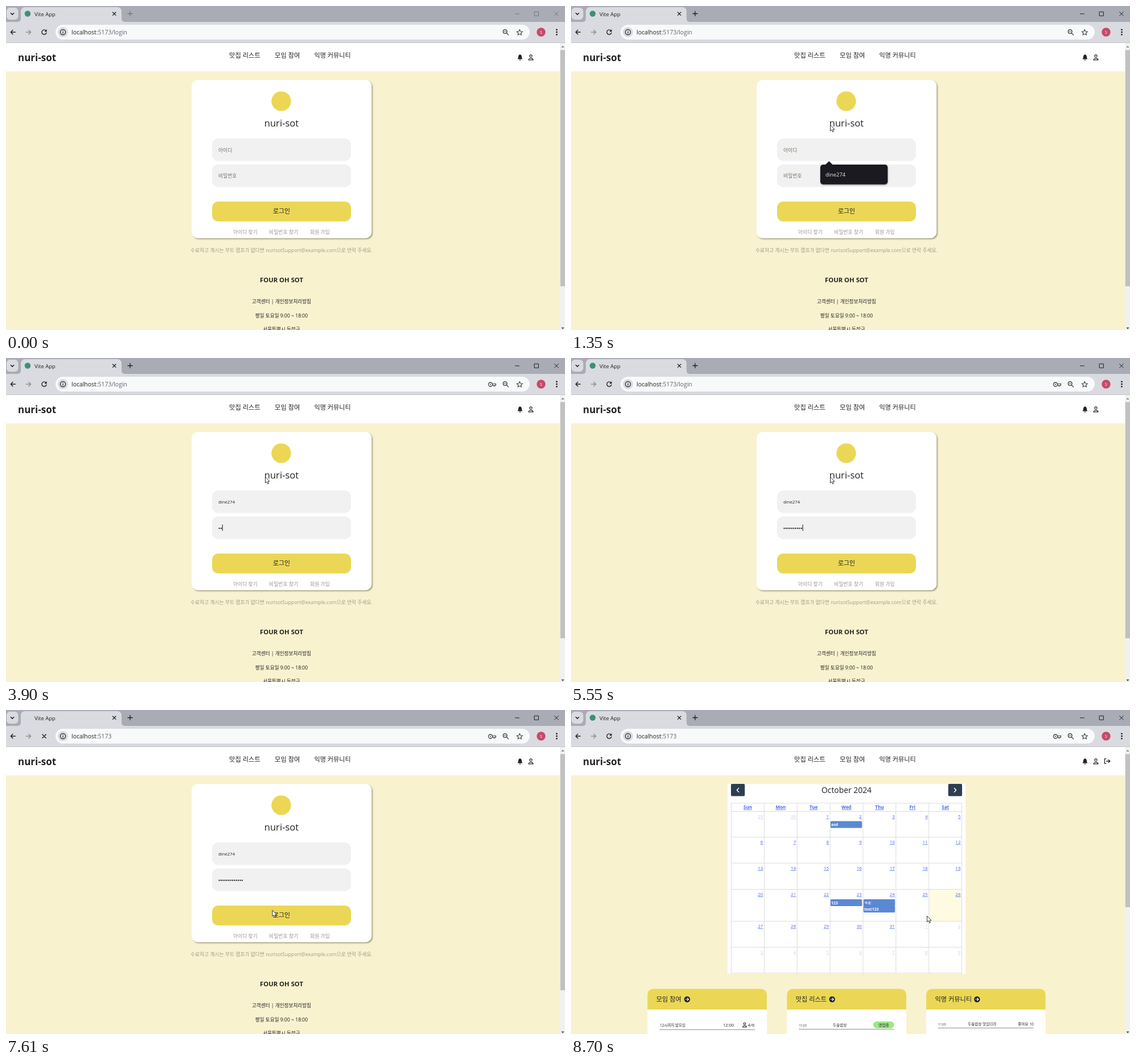
An HTML page that plays this animation: 982x570 px, repeating every 8.77 s.

```html
<!DOCTYPE html>
<html lang="ko">
<head>
<meta charset="utf-8">
<title>Login</title>
<style>
html, body { margin: 0; width: 100%; height: 100%; overflow: hidden; background: #f9f2cf; }
svg { display: block; width: 100%; height: 100%; }
text { font-family: "Open Sans", "Noto Sans CJK KR", "Noto Sans CJK", sans-serif; fill: #222; white-space: pre; }
.line { fill: none; stroke-linecap: round; stroke-linejoin: round; }
</style>
</head>
<body>
<svg id="stage" viewBox="0 0 982 570"></svg>
<script>
const LOOP = 8770;
const USER = 'dine274';
const BRAND = 'nuri-sot';
const PLACE = '두솔밥상';
const YELLOW = '#ebd755';
const DARK = '#202124';

const rect = (x, y, w, h, fill, r = 0, extra = '') =>
  `<rect x="${x}" y="${y}" width="${w}" height="${h}" rx="${r}" fill="${fill}" ${extra}/>`;
const circle = (x, y, r, fill, extra = '') =>
  `<circle cx="${x}" cy="${y}" r="${r}" fill="${fill}" ${extra}/>`;
const line = (d, color = DARK, w = 1.3, extra = '') =>
  `<path class="line" d="${d}" stroke="${color}" stroke-width="${w}" ${extra}/>`;
const shape = (d, fill, extra = '') => `<path d="${d}" fill="${fill}" ${extra}/>`;
const text = (x, y, s, size, { fill = '#222', weight = 400, anchor = 'start', extra = '' } = {}) =>
  `<text x="${x}" y="${y}" font-size="${size}" font-weight="${weight}" text-anchor="${anchor}" style="fill:${fill}" ${extra}>${s}</text>`;
const group = (id, body) => `<g id="${id}">${body}</g>`;

const person = (x, y, s = 1) => `<g transform="translate(${x} ${y}) scale(${s})">` +
  `<circle cy="-2.4" r="2.1" fill="none" stroke="${DARK}" stroke-width="1.2"/>` +
  line('M-4 4.6C-4 0.6 4 0.6 4 4.6Z', DARK, 1.2) + '</g>';
const arrowBadge = (x, y) => circle(x, y, 5.2, DARK) +
  line(`M${x - 2.6} ${y}h5M${x + 0.3} ${y - 2.3}l2.3 2.3l-2.3 2.3`, '#fff', 1.2);

function browser() {
  return rect(0, 0, 982, 40, '#a9acb5') +
    rect(0, 28, 982, 37, '#d9dbe0') +
    rect(0, 64, 982, 1, '#bfc1c6') +
    rect(1, 3, 20.5, 21, '#d9dbe0', 6) +
    line('M8.5 12.5l2.6 2.6l2.6 -2.6', DARK, 1.5) +
    shape('M20 28Q26 28 26 22V10Q26 2 34 2H195Q203 2 203 10V22Q203 28 209 28Z', '#d9dbe0') +
    group('favicon', circle(38, 13.5, 5.2, '#3f8f78')) +
    text(50, 18.3, 'Vite App', 9.5) +
    line('M187.5 11l5.4 5.4m0 -5.4l-5.4 5.4', DARK, 1.3) +
    `<g id="controls">` +
    '<path class="line" d="M214 13.5h8M218 9.5v8" stroke-width="1.3"/>' +
    '<path class="line" d="M894.5 13.8h7M928.5 10.3h7v7h-7zM963.5 10.3l7 7m0 -7l-7 7" stroke-width="1"/></g>' +
    line('M16.3 46H8.5M12 42.3L8.3 46l3.7 3.7', DARK, 1.4) +
    line('M35.7 46h7.8M40 42.3l3.7 3.7l-3.7 3.7', '#8b8d92', 1.3) +
    group('reload', line('M70.2 43.3A4.1 4.1 0 1 0 71 47.2', DARK, 1.4) + shape('M71.6 41v4.3h-4.3z', DARK)) +
    group('stop', line('M64 43l6.2 6.2m0 -6.2l-6.2 6.2', DARK, 1.4)) +
    rect(87, 33, 833, 26, '#f8f9fb', 13) +
    circle(100, 46, 9, '#d9dbe0') +
    circle(100, 46, 4.6, 'none', `stroke="${DARK}" stroke-width="1.2"`) +
    line('M100 45.8v2.3M100 43.7v0.1', DARK, 1.2) +
    '<text x="115" y="50.2" font-size="10.45">localhost<tspan id="path" style="fill:#5f6368"></tspan></text>' +
    group('key', circle(851, 46.5, 3.5, 'none', 'stroke="#3c4043" stroke-width="1.3"') +
      circle(851, 46.5, 1.1, '#3c4043') +
      line('M854.5 45.3h6v2.6h-1.7v1.6h-2v-1.6h-2.2', '#3c4043', 1.1)) +
    circle(876.7, 45, 3.4, 'none', 'stroke="#3c4043" stroke-width="1.3"') +
    line('M879.3 47.6l3.4 3.4M875.2 45h3', '#3c4043', 1.2) +
    line('M902.3 41.3l1.5 3.4l3.6 .3l-2.8 2.4l.9 3.6l-3.2 -1.9l-3.2 1.9l.9 -3.6l-2.8 -2.4l3.6 -.3z', '#3c4043', 1.1) +
    circle(940, 46, 7.7, '#c6496a') +
    text(940, 48.5, 'S', 7, { fill: '#fff', anchor: 'middle' }) +
    [41.7, 46, 50.3].map(y => circle(967.5, y, 1.4, DARK)).join('');
}

function header() {
  return rect(0, 65, 973, 50, '#fff') +
    text(21, 97, BRAND, 17, { weight: 700 }) +
    text(392, 90.5, '맛집 리스트', 11.3) +
    text(472, 90.5, '모임 참여', 11.3) +
    text(541.5, 90.5, '익명 커뮤니티', 11.1) +
    shape('M898.5 93.6Q900 92 900 89.5Q900 86 903 85.2Q906 86 906 89.5Q906 92 907.5 93.6ZM901.4 94.4h3.2a1.6 1.3 0 0 1 -3.2 0Z', DARK) +
    person(922, 90.3) +
    group('logout', line('M940 85.8h-2.6v8.4h2.6M940.6 90h6M944.2 87.4l2.6 2.6l-2.6 2.6', DARK, 1.3));
}

function login() {
  const links = '#99978a';
  const field = y => rect(362, y, 244, 39.7, '#f1f1f1', 11);
  const center = { anchor: 'middle' };
  return rect(327.7, 131.7, 316.3, 278.5, '#8d8a76', 11, 'opacity=".8" filter="url(#soft)"') +
    rect(326, 130, 316.3, 278.5, '#fff', 11) +
    circle(483.5, 167.5, 17.2, YELLOW) +
    text(484, 212, BRAND, 16.6, center) +
    field(233) + field(278.7) +
    rect(362, 344, 244, 35, YELLOW, 11) +
    text(484, 365.4, '로그인', 10.9, { weight: 500, anchor: 'middle' }) +
    text(399, 401.4, '아이디 찾기', 8.8, { fill: links }) +
    text(462, 401.4, '비밀번호 찾기', 8.9, { fill: links }) +
    text(534, 401.4, '회원 가입', 8.8, { fill: links }) +
    text(484, 433.3, '수료하고 계시는 부트 캠프가 없다면 nurisotSupport@example.com으로 연락 주세요.', 8.75, { fill: '#a19d88', anchor: 'middle' }) +
    text(484, 485.5, 'FOUR OH SOT', 11.3, { weight: 700, anchor: 'middle' }) +
    text(484, 523.4, '고객센터 | 개인정보처리방침', 8.6, center) +
    text(484, 547.8, '평일 토요일 9:00 ~ 18:00', 8.6, center) +
    text(484, 572.2, '서울특별시 동작구', 8.6, center) +
    group('idHint', text(373, 256.6, '아이디', 8.8, { fill: '#757566' })) +
    group('pwHint', text(373, 302.2, '비밀번호', 8.8, { fill: '#757566' })) +
    text(373, 256.4, '', 7.75, { extra: 'id="idText"' }) +
    '<g id="dots"></g>' +
    rect(0, 0, 1, 11, '#111', 0, 'id="caret"') +
    group('popup', rect(438, 280, 118.5, 35, '#000', 5, 'opacity=".4" filter="url(#soft)"') +
      shape('M446.5 279.5L453.3 273L460 279.5Z', '#1a1a20') +
      rect(438, 279, 118.3, 34.7, '#1a1a20', 5, 'id="popupBox"') +
      text(447, 299.7, USER, 9.35, { fill: '#e6e6e8' }));
}

function month(bounds, events) {
  const X = 281.5, COL = 57.86, BLUE = '#4a69e8';
  let s = rect(628.5, bounds[3], COL, bounds[4] - bounds[3], '#fffbe2');
  ['Sun', 'Mon', 'Tue', 'Wed', 'Thu', 'Fri', 'Sat'].forEach((d, i) => {
    s += text(X + COL * (i + .5), 174, d, 8, { fill: BLUE, weight: 700, anchor: 'middle', extra: 'text-decoration="underline"' });
  });
  for (let i = 0; i < 42; i++) {
    const n = i - 1, out = n < 1 || n > 31;
    const label = n < 1 ? n + 30 : n > 31 ? n - 31 : n;
    s += text(X + COL * (i % 7 + 1) - 2, bounds[i / 7 | 0] + 11.6, label, 8,
      { fill: BLUE, anchor: 'end', extra: `text-decoration="underline" opacity="${out ? .3 : 1}"` });
  }
  let grid = bounds.map(y => `M281 ${y}H687`).join('') + 'M281 164H687';
  for (let i = 0; i < 8; i++) grid += `M${X + COL * i} 164V463`;
  s += line(grid, '#dcdcdc', 1);
  return s + events.map(([col, y, label]) =>
    rect(X + COL * col + .8, y, 55.4, 11.9, '#5b88d3', 1.5) +
    text(X + COL * col + 2, y + 8.6, label, 7, { fill: '#fff', weight: 700 })).join('');
}

function panel(x, title, iconX, body) {
  return rect(x, 490.5, 209.7, 100, '#fff', 12) +
    shape(`M${x} 527V502.5q0 -12 12 -12h185.7q12 0 12 12V527Z`, YELLOW) +
    text(x + 15.5, 512.5, title, 11.2, { weight: 500 }) + arrowBadge(iconX, 509) + body;
}

function home() {
  const before = [0, 1, 2, 3, 4, 5, 6].map(i => 178.5 + i * 47.42);
  const after = [178.5, 223.7, 269.3, 315.5, 371.7, 417.3, 463];
  const rule = (x, y) => line(`M${x} ${y}h167`, '#8a8a8a', 1);
  return rect(275, 130, 418, 334, '#fff') +
    rect(281, 130, 24.3, 21.6, '#2c3e50', 2) + rect(662.7, 130, 24.3, 21.6, '#2c3e50', 2) +
    group('chevrons', line('M294.6 137.6l-3.2 3.3l3.2 3.3M673.4 137.6l3.2 3.3l-3.2 3.3', '#fff', 1.5)) +
    text(484, 146, 'October 2024', 13.9, { anchor: 'middle' }) +
    group('monthEmpty', month(before, [])) +
    group('monthFull', month(after, [[3, 195.5, 'asd'], [3, 333, '123'], [4, 333, 'ㅋㅌ'], [4, 344.4, 'test123']])) +
    panel(134.3, '모임 참여', 204,
      text(156, 556.8, '12시까지 밥모임', 6.5) + text(267, 557.2, '12:00', 7.5) +
      person(305, 554, .85) + text(310.5, 557.2, '4/6', 8) + rule(156, 562.3)) +
    panel(379.3, '맛집 리스트', 458.7,
      text(400.5, 556.6, '1123', 5.9) + text(460, 556.6, PLACE, 6.6) +
      rect(531, 548, 36.5, 12, '#9be880', 6) +
      text(549.3, 556.6, '영업중', 6.8, { anchor: 'middle', weight: 500 }) + rule(400.5, 561.6)) +
    panel(624, '익명 커뮤니티', 713.3,
      text(645, 555.4, '1123', 5.9) + text(697, 555.4, PLACE + ' 맛있더라', 6.6) +
      text(785, 555.4, '좋아요 10', 6.7) + rule(645, 559.4));
}

const stage = document.getElementById('stage');
stage.innerHTML =
  '<defs><filter id="soft" x="-10%" y="-10%" width="120%" height="130%"><feGaussianBlur stdDeviation=".9"/></filter></defs>' +
  rect(0, 0, 982, 570, '#f9f2cf') + browser() + header() +
  group('login', login()) + group('home', home()) +
  rect(973, 65, 9, 505, '#f1f1f1') +
  shape('M975.3 73L978 69.8L980.7 73Z', '#8a8a8a') + shape('M975.3 565.5L978 568.7L980.7 565.5Z', '#505050') +
  rect(973.8, 77.5, 8.2, 415.5, '#c1c1c1', 0, 'id="thumb"') +
  group('arrow', shape('M0 0V10.6L2.5 8.4L4.2 12.3L6 11.5L4.3 7.8H7.6Z', '#fff', 'stroke="#222" stroke-width=".9" stroke-linejoin="round"')) +
  group('beam', line('M-2 -6H2M0 -6V6M-2 6H2', '#333', 1));

const el = {};
stage.querySelectorAll('[id]').forEach(n => el[n.id] = n);
const show = (id, on) => el[id].style.display = on ? '' : 'none';

const focusTimes = [820, 3370];
const idKeys = [1770, 2290, 2360, 2420, 2890, 3030, 3170];
const pwKeys = [3700, 3900, 4030, 4160, 5020, 5150, 5280, 5430, 5490, 5550, 5960, 6020, 6160];
const inputs = [...focusTimes, ...idKeys, ...pwKeys];
// Pointer stops: time, x, y
const track = [
  [70, 565, 551], [300, 540, 470], [560, 490, 320], [800, 467, 248], [890, 467, 248],
  [1010, 438, 226], [1150, 455.5, 209.3], [6830, 455.5, 209.3], [7060, 462, 280],
  [7280, 468, 352.3], [7880, 468, 352.3], [8140, 494.5, 354.5], [8440, 494.5, 354.5], [8700, 625.5, 362.3]
];

const typed = (keys, t) => keys.filter(k => k <= t).length;
function pointer(t) {
  const i = track.findIndex(k => k[0] > t);
  if (i < 0) return track[track.length - 1].slice(1);
  if (i === 0) return track[0].slice(1);
  const [t0, x0, y0] = track[i - 1], [t1, x1, y1] = track[i];
  const p = (t - t0) / (t1 - t0);
  return [x0 + (x1 - x0) * p, y0 + (y1 - y0) * p];
}

function draw(t) {
  const atHome = t >= 7670, loading = t >= 7480 && t < 8000;
  show('login', !atHome);
  show('home', atHome);
  show('monthEmpty', t < 7800);
  show('monthFull', t >= 7800);
  show('chevrons', t >= 7740);
  show('logout', t >= 7740);
  show('favicon', !loading);
  show('reload', !loading);
  show('stop', loading);
  show('key', t >= 3700);
  el.controls.setAttribute('stroke', t < 70 ? '#74777d' : DARK);
  el.path.textContent = t < 7480 ? ':5173/login' : ':5173';
  el.thumb.setAttribute('height', atHome ? 269.5 : 415.5);

  const idCount = typed(idKeys, t), pwCount = typed(pwKeys, t);
  show('idHint', !idCount);
  show('pwHint', !pwCount);
  el.idText.textContent = USER.slice(0, idCount);
  el.dots.innerHTML = Array.from({ length: pwCount }, (_, i) => circle(374.6 + i * 3.36, 299.7, 1.15, '#111')).join('');

  // The caret blinks from the latest key press or focus.
  const onPassword = t >= 3370;
  const last = Math.max(...inputs.filter(k => k <= t));
  show('caret', t >= 820 && t < 7280 && Math.floor((t - last) / 530) % 2 === 0);
  const idWidth = !atHome && idCount ? el.idText.getComputedTextLength() : 0;
  el.caret.setAttribute('x', 373 + (onPassword ? pwCount * 3.36 : idWidth));
  el.caret.setAttribute('y', onPassword ? 293 : 247);

  const closing = t >= 3170;
  show('popup', t >= 880 && t < 3370);
  el.popup.setAttribute('opacity', closing ? Math.max(0, .92 - (t - 3170) / 200) : 1);
  el.popupBox.setAttribute('height', closing ? 33.3 : 34.7);

  const [x, y] = pointer(t);
  const inField = !atHome && x > 362 && x < 606 && (y > 233 && y < 273 || y > 279 && y < 318);
  show('arrow', t >= 70 && !inField);
  show('beam', t >= 70 && inField);
  el.arrow.setAttribute('transform', `translate(${x} ${y})`);
  el.beam.setAttribute('transform', `translate(${x} ${y})`);
}

const start = performance.now();
function tick() {
  draw((performance.now() - start) % LOOP);
  requestAnimationFrame(tick);
}
tick();
</script>
</body>
</html>
```
